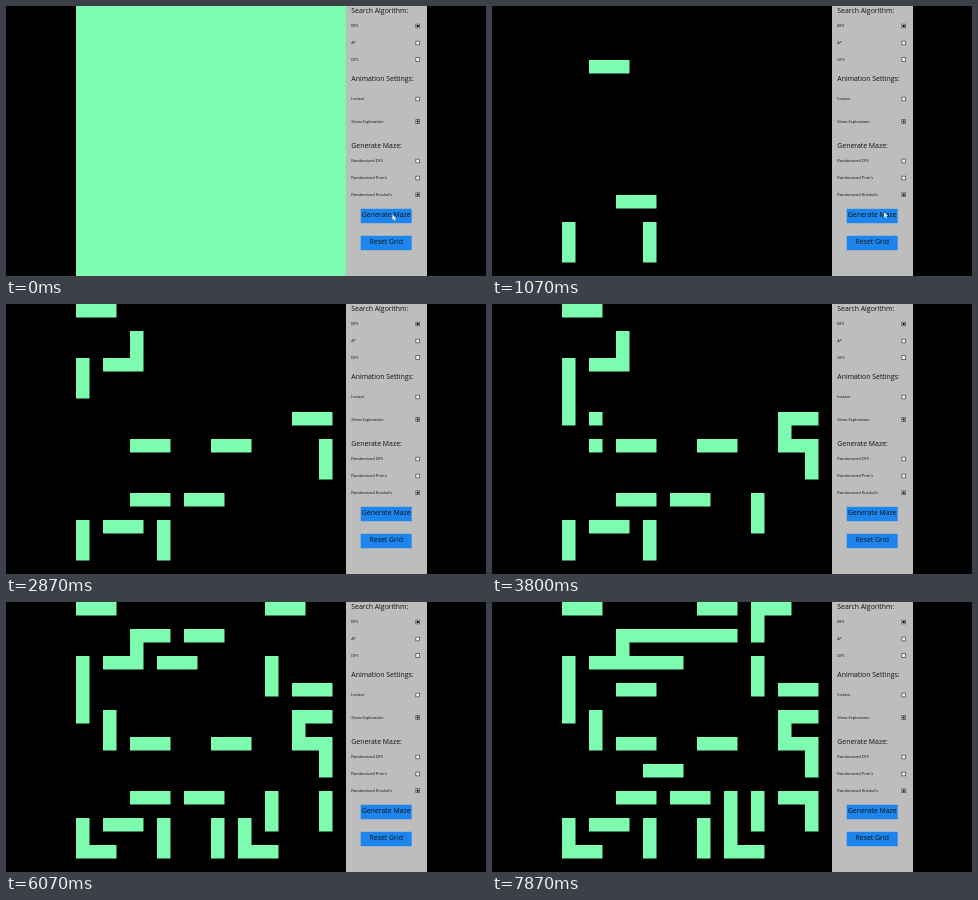
These frames come from a looping animation (480x270 px, 8000 ms). An HTML page with a canvas:

```html
<!DOCTYPE html>
<html lang="en">
<head>
<meta charset="utf-8">
<title>Maze generator</title>
<style>
html, body { margin: 0; width: 100%; height: 100%; overflow: hidden; background: #000; }
canvas { display: block; width: 480px; height: 270px; }
</style>
</head>
<body>
<canvas id="stage" width="480" height="270"></canvas>
<script>
const ctx = document.getElementById('stage').getContext('2d');
const LOOP = 8000, FPS = 15, FIRST_TICK = 5;
const LEFT = 70, CELL = 13.5, SIZE = 270;
const GREEN = '#7dfcb0', GRAY = '#bdbdbd', BLUE = '#1c86ee';
const FONT = '"Comic Sans MS", "Open Sans", sans-serif';

// Passages in the order they open: column, row, direction to the neighbour node.
const passages = `2 4 R,4 14 R,0 16 D,6 16 D,4 2 D,16 8 R,4 10 R,8 14 R,2 16 R,
  0 0 R,0 4 D,10 10 R,18 10 D,0 6 D,16 8 D,14 14 D,16 10 R,
  2 8 D,6 4 R,18 14 D,16 6 R,0 18 R,14 0 R,4 2 R,10 16 D,14 4 D,
  12 16 D,8 2 R,12 18 R,4 6 R,12 16 U,6 2 R,12 2 L,10 0 R,6 12 R,
  16 14 R,4 4 R,14 0 D`.split(',').map(s => s.trim().split(' '));

const steps = { R: [1, 0], L: [-1, 0], D: [0, 1], U: [0, -1] };

// Each passage opens its two end nodes, then the wall between them.
const cells = passages.flatMap(([c, r, dir]) => {
  const [dx, dy] = steps[dir];
  return [0, 2, 1].map(n => [+c + dx * n, +r + dy * n]);
});

const headings = [['Search Algorithm:', 5.3], ['Animation Settings:', 72.8], ['Generate Maze:', 140.3]];
const options = [
  ['BFS', 20, true], ['A*', 37], ['DFS', 53.5],
  ['Instant', 93], ['Show Exploration', 115.5, true],
  ['Randomized DFS', 155], ["Randomized Prim's", 172], ["Randomized Kruskal's", 188.7, true]
];
const buttons = [['Generate Maze', 203], ['Reset Grid', 230]];

function label(text, x, y, size, align = 'left') {
  ctx.font = `${size}px ${FONT}`;
  ctx.textAlign = align;
  ctx.textBaseline = 'middle';
  ctx.fillStyle = '#111';
  ctx.fillText(text, x, y);
}

function box(color, x, y, w, h) {
  ctx.fillStyle = color;
  ctx.fillRect(x, y, w, h);
}

function drawPanel() {
  box(GRAY, 340, 0, 81, SIZE);
  for (const [text, y] of headings) label(text, 345.3, y, 6.9);
  for (const [text, y, on] of options) {
    label(text, 345.3, y, 4);
    box('#444', 409.5, y - 2.2, 4.4, 4.4);
    box('#f4f4f4', 410.2, y - 1.5, 3, 3);
    if (on) box('#000', 410.7, y - 1, 2, 2);
  }
  for (const [text, y] of buttons) {
    box(BLUE, 354.7, y - 0.2, 51, 14.4);
    label(text, 380.2, y + 6.5, 6.9, 'center');
  }
}

function drawMaze(tick) {
  if (tick < 0) return box(GREEN, LEFT, 0, SIZE, SIZE);
  ctx.beginPath();
  const seen = new Set();
  for (const [c, r] of cells.slice(0, tick + 1)) {
    const key = c + ',' + r;
    if (seen.has(key)) continue;
    seen.add(key);
    ctx.rect(LEFT + c * CELL, r * CELL, CELL, CELL);
  }
  ctx.fillStyle = GREEN;
  ctx.fill();
}

function drawCursor(t) {
  if (t >= 1196) return;
  const x = t < 66 ? 386.5 : t < 126 ? 388.5 : t < 326 ? 390.5 : 392;
  const y = t < 66 ? 208.8 : t < 326 ? 208.2 : 206.2;
  ctx.beginPath();
  ctx.moveTo(x, y);
  ctx.lineTo(x, y + 5.2);
  ctx.lineTo(x + 1.3, y + 4.1);
  ctx.lineTo(x + 2.3, y + 6);
  ctx.lineTo(x + 3, y + 5.6);
  ctx.lineTo(x + 2.2, y + 3.8);
  ctx.lineTo(x + 3.8, y + 3.7);
  ctx.closePath();
  ctx.fillStyle = '#fff';
  ctx.fill();
}

function draw(now) {
  const t = now % LOOP;
  const tick = Math.floor((t + 4) * FPS / 1000) - FIRST_TICK;
  box('#000', 0, 0, 480, 270);
  drawMaze(tick);
  drawPanel();
  drawCursor(t);
}

let start;
function frame(now) {
  if (start === undefined) start = now;
  draw(now - start);
  requestAnimationFrame(frame);
}
draw(0);
requestAnimationFrame(frame);
</script>
</body>
</html>
```
